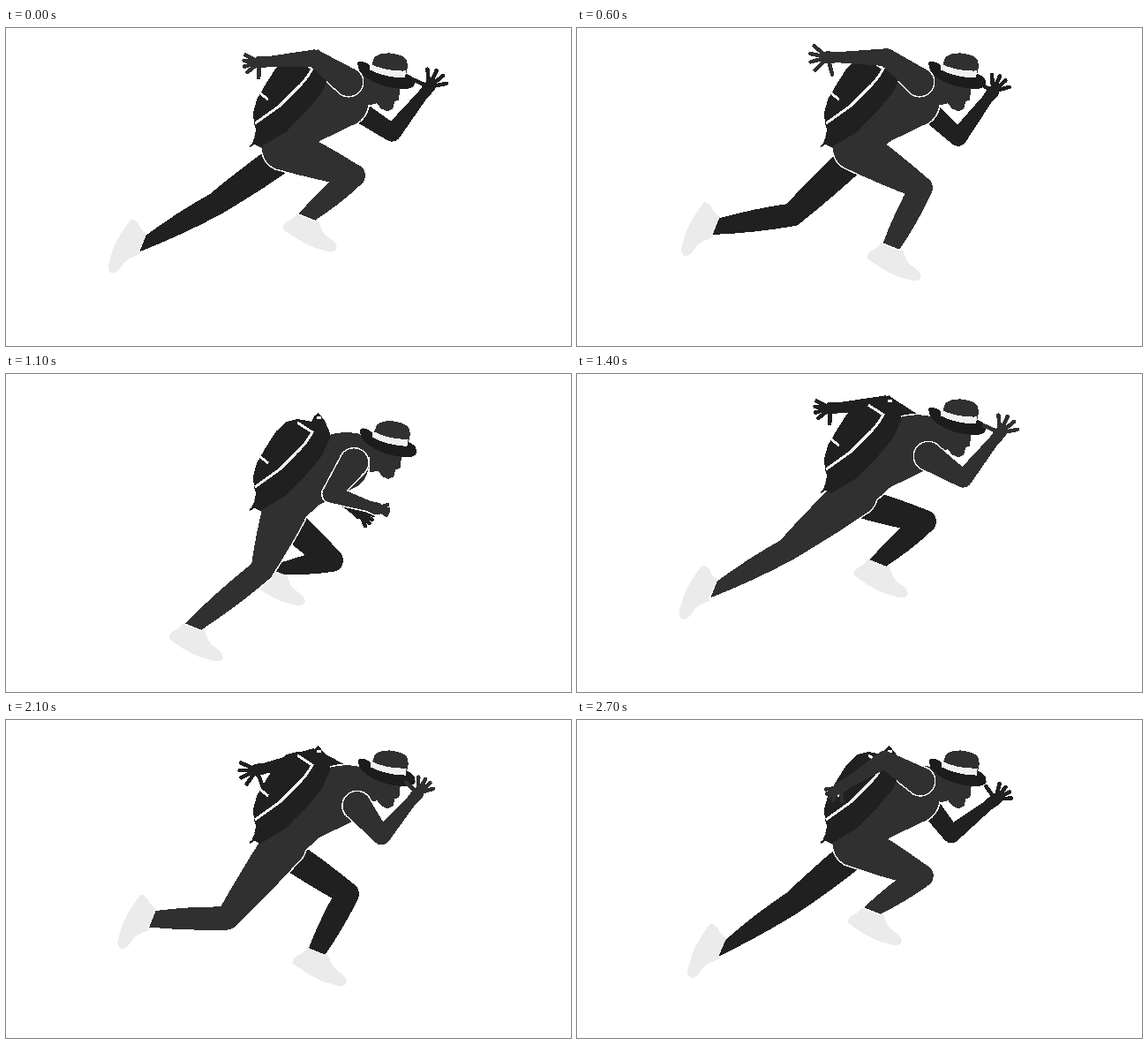
An HTML page for the animation above (2.8 s loop, 640 by 360 pixels).

```html
<!DOCTYPE html>
<html lang="en">
<head>
<meta charset="utf-8">
<title>Runner</title>
<style>
html, body { margin: 0; width: 100%; height: 100%; overflow: hidden; background: #fff; }
svg { display: block; width: 100vw; height: 100vh; shape-rendering: crispEdges; }
.far { fill: #202020; }
.near { fill: #303030; }
.shoe { fill: #ebebeb; }
.rim { stroke: #fff; stroke-width: 3; paint-order: stroke; }
.fingers { fill: none; stroke: #202020; stroke-width: 4.5; stroke-linecap: round; }
.light { stroke: #303030; }
.tape { fill: none; stroke: #f2f2f2; stroke-width: 3; }
</style>
</head>
<body>
<svg viewBox="0 0 640 360">
  <defs>
    <path id="shoe" class="shoe" d="M-12,-1Q-13,8 -18,12Q-23,19 -20,23Q2,29 20,29L38,27Q45,25 44,19Q41,14 34,13Q24,11 20,6L13,-1Z"/>
  </defs>
  <path id="farArm" class="far"/>
  <path id="farFingers" class="fingers"/>
  <use id="farShoe" href="#shoe"/>
  <path id="farLeg" class="far"/>
  <use id="nearShoe" href="#shoe"/>
  <path id="body" class="near rim"/>
  <g id="head">
    <path class="near" d="M408,50L410,72L411,86L420,84L425,90L432,93L438,90L440,82L445,80L446,68L452,62Z"/>
    <path fill="#1c1c1c" d="M398,38Q401,34 411,40Q430,58 453,50Q464,54 463,62Q461,69 445,67Q425,66 408,55Q398,48 398,38Z"/>
    <path class="near" d="M413,43L417,32Q422,27 434,27Q452,29 454,36L455,42L453,52Z"/>
    <path fill="#f0f0f0" d="M412,39Q430,48 453,47L452,55Q430,55 412,46Z"/>
  </g>
  <path id="armRim" class="near rim"/>
  <g id="pack">
    <path class="far" d="M367,46L361,32L354,23L349,27L346,33L330,30L318,33L306,44L295,61L284,80L280,95L281,108L285,119L280,130L288,134L318,116L342,91L357,73L367,52Z"/>
    <path fill="none" stroke="#202020" stroke-width="2" d="M286,112Q280,122 284,128L276,133M285,118L278,133"/>
    <path class="tape" d="M330,34L347,45Q340,58 328,69L310,87L282,107M287,72L297,80M352,29L357,29"/>
  </g>
  <path id="nearArm" class="near"/>
  <path id="nearFingers" class="fingers light"/>
</svg>
<script>
const LOOP = 2800, HALF = LOOP / 2, STEP = 100;
const $ = id => document.getElementById(id);

// Stride: time, knee x y, ankle x y. The far side runs half a loop later.
const stride = [
  [0, 394, 167, 341, 214],
  [400, 393, 161, 351, 225],
  [600, 390, 181, 356, 247],
  [900, 374, 222, 327, 285],
  [1100, 290, 222, 212, 286],
  [1400, 238, 199, 155, 244],
  [1800, 238, 196, 150, 224],
  [2300, 270, 240, 190, 226],
  [2500, 369, 211, 305, 223]
];
// Arm swing: time, upper arm angle, forearm angle, finger spread
const swing = [
  [0, 215, 176, .7],
  [600, 217, 180, 1],
  [1100, 126, 18, .1],
  [1400, 33, -51, 1],
  [1800, 34, -55, 1],
  [2300, 75, -41, .6],
  [2700, 211, 148, .5]
];

const clamp = (v, lo, hi) => Math.min(hi, Math.max(lo, v));
const wave = (t, peak, period) => Math.cos(2 * Math.PI * (t - peak) / period);
const ramp = (t, from, to) => {
  const u = clamp((t - from) / (to - from), 0, 1);
  return u * u * (3 - 2 * u);
};
const polar = (deg, r) => [Math.cos(deg * Math.PI / 180) * r, Math.sin(deg * Math.PI / 180) * r];
const add = (p, q) => [p[0] + q[0], p[1] + q[1]];
const sub = (p, q) => [p[0] - q[0], p[1] - q[1]];
const pt = p => p.map(v => v.toFixed(1)).join();

// Periodic monotone cubic through the keys
function sample(keys, t) {
  const n = keys.length;
  const at = i => {
    const turn = Math.floor(i / n), k = keys[i - turn * n];
    return [k[0] + turn * LOOP, ...k.slice(1)];
  };
  let i = n - 1;
  while (keys[i][0] > t) i--;
  const [p, a, b, q] = [at(i - 1), at(i), at(i + 1), at(i + 2)];
  const h = b[0] - a[0], u = (t - a[0]) / h;
  const tangent = (s, r) => s * r <= 0 ? 0 : 2 * s * r / (s + r);
  return a.slice(1).map((v, j) => {
    const slope = (x, y) => (y[j + 1] - x[j + 1]) / (y[0] - x[0]);
    const m = slope(a, b), ta = tangent(slope(p, a), m), tb = tangent(m, slope(b, q));
    return v + h * (ta * u * (1 - u) ** 2 + m * u * u * (3 - 2 * u) - tb * u * u * (1 - u));
  });
}

const disc = (c, r) => `M${pt([c[0] - r, c[1]])}a${r},${r} 0 1 0 ${2 * r},0a${r},${r} 0 1 0 ${-2 * r},0Z`;

// Swelling segment from a to b; cut is half of a slanted end
function taper(a, ra, b, rb, swell = 0, cut) {
  const [dx, dy] = sub(b, a), len = Math.hypot(dx, dy) || 1;
  const side = r => [-dy / len * r, dx / len * r];
  const start = side(ra), end = cut || side(rb);
  const mid = [(a[0] + b[0]) / 2, (a[1] + b[1]) / 2];
  const bulge = add([(start[0] + end[0]) / 2, (start[1] + end[1]) / 2], side(2 * swell));
  return `M${pt(add(a, start))}Q${pt(add(mid, bulge))} ${pt(add(b, end))}` +
    `L${pt(sub(b, end))}Q${pt(sub(mid, bulge))} ${pt(sub(a, start))}Z`;
}

const torso = drop => {
  const p = (x, y) => pt([x, y + drop]);
  return `M${p(289, 132)}Q${p(291, 155)} ${p(316, 158)}L${p(334, 146)}L${p(355, 127)}L${p(390, 110)}` +
    `Q${p(408, 104)} ${p(411, 84)}L${p(412, 62)}Q${p(408, 48)} ${p(396, 46)}Q${p(374, 43)} ${p(356, 52)}L${p(300, 112)}Z`;
};

// Lowest as the weight passes over the planted foot
const dropAt = t => 25 * ((1 + wave(t, 1000, HALF)) / 2) ** 2.6 - 1;

const draw = (id, d) => $(id).setAttribute('d', d);
const move = (id, value) => $(id).setAttribute('transform', value);

function leg(id, t, hip, girth) {
  const [kx, ky, ax, ay] = sample(stride, t), knee = [kx, ky], ankle = [ax, ay];
  const tilt = 22 + 90 * (ramp(t, 1100, 1300) - ramp(t, 2250, 2500));
  move(id + 'Shoe', `translate(${pt(ankle)}) rotate(${tilt.toFixed(1)})`);
  return disc(hip, girth) + taper(hip, girth, knee, 13, 1) + disc(knee, 13) +
    taper(knee, 13, ankle, 9, 1.5, polar(tilt, -10));
}

function arm(id, t, girth) {
  const [upper, fore, spread] = sample(swing, t);
  const sway = clamp(-1.4 * wave(t, 330, LOOP), -1, 1);
  const shoulder = [393 + 5 * sway, 76 + 16 * sway + dropAt(t)];
  const elbow = add(shoulder, polar(upper, 36 + 13 * Math.abs(polar(upper, 1)[0])));
  const wrist = add(elbow, polar(fore, 42 + 14 * spread));
  const palm = add(wrist, polar(fore, 11));
  const fingers = [-105, -45, -15, 12, 40].map(f => {
    const tip = add(palm, polar(fore + f * (.3 + .7 * spread), 12 + 8 * spread));
    return `M${pt(palm)}L${pt(tip)}`;
  });
  draw(id + 'Fingers', fingers.join(''));
  return disc(shoulder, girth) + taper(shoulder, girth, elbow, 10) + disc(elbow, 10) +
    taper(elbow, 10, wrist, 6) + taper(wrist, 6, palm, 7) + disc(palm, 7);
}

function render(t) {
  const drop = dropAt(t), later = (t + HALF) % LOOP;
  draw('farArm', arm('far', later, 12));
  draw('farLeg', leg('far', later, [316, 143 + drop], 17));
  draw('body', torso(drop) + leg('near', t, [315, 135 + drop], 25));
  const near = arm('near', t, 16);
  draw('armRim', near);
  draw('nearArm', near);
  move('pack', `translate(0 ${drop.toFixed(1)})`);
  move('head', `translate(${pt([drop * .12, drop * 1.25])}) rotate(${(drop * .1).toFixed(1)} 431 52)`);
}

function tick() {
  render(Math.floor(performance.now() % LOOP / STEP) * STEP);
  requestAnimationFrame(tick);
}
tick();
</script>
</body>
</html>
```
